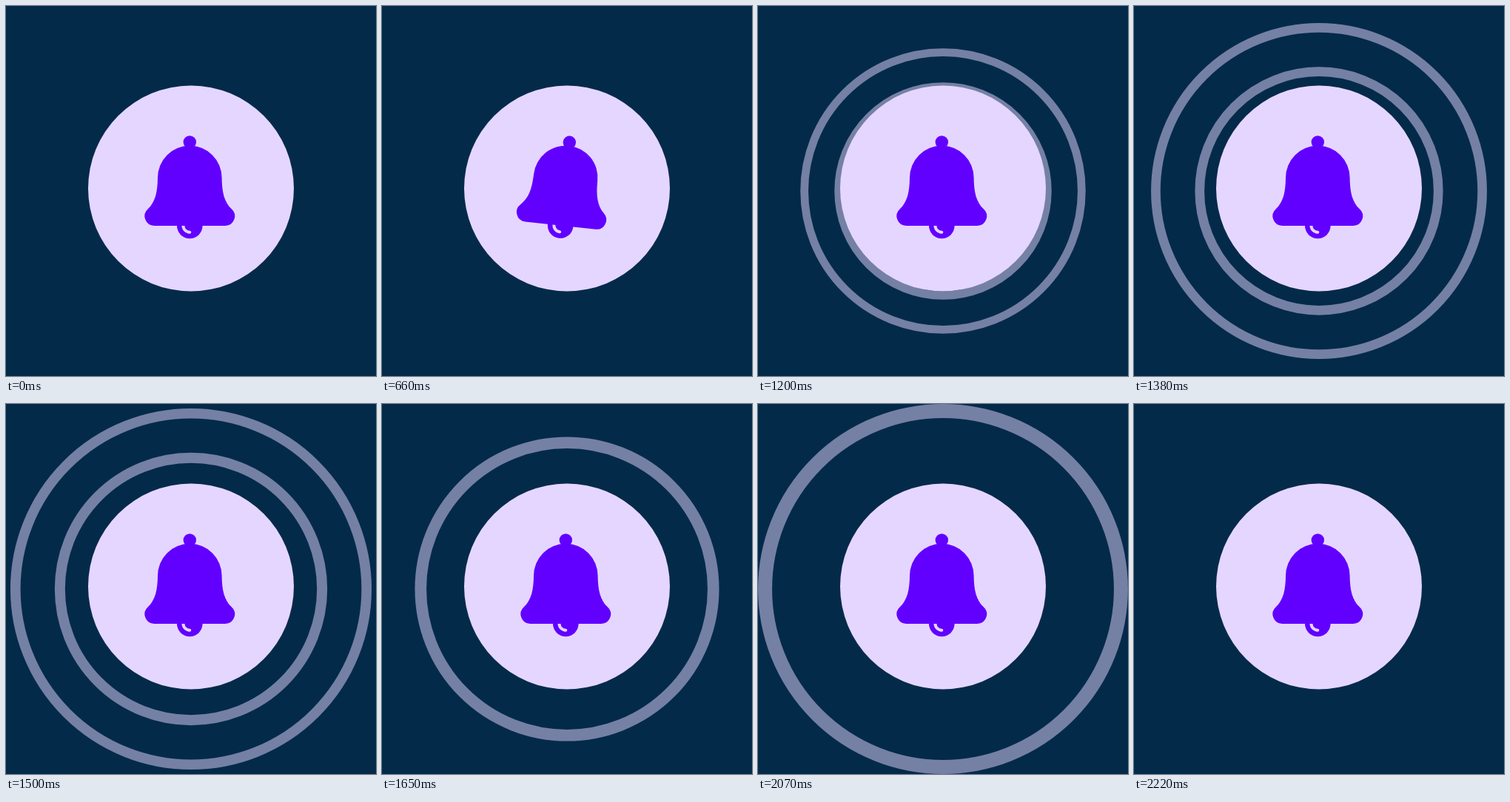
An HTML page for the animation above (2730 ms loop, 500 px wide and 500 px high).

```html
<!DOCTYPE html>
<html lang="en">
<head>
<meta charset="utf-8">
<title>Ringing bell</title>
<style>
  html, body { margin: 0; width: 100%; height: 100%; overflow: hidden; background: #042a4a; }
  svg { display: block; width: 100%; height: 100%; }
</style>
</head>
<body>
<svg viewBox="0 0 500 500">
  <g fill="none" stroke="#e5d6ff" stroke-opacity=".5">
    <circle id="outer" cx="250" cy="250"/>
    <circle id="inner" cx="250" cy="250"/>
  </g>
  <circle cx="250" cy="246.5" r="139" fill="#e5d6ff"/>
  <g id="bell" fill="#6200ff">
    <circle cx="248.3" cy="184" r="8.7"/>
    <circle cx="248.3" cy="297" r="17.3"/>
    <path d="M239.5 294V297A8.8 8.8 0 0 0 248.3 305.7" fill="none" stroke="#e5d6ff" stroke-width="4" stroke-linecap="round"/>
    <path d="M205 232A43.3 43.3 0 0 1 291.6 232C291.8 252 295 265 304.8 274.3A13 13 0 0 1 296.2 297H200.4A13 13 0 0 1 191.8 274.3C201.6 265 204.8 252 205 232Z"/>
  </g>
</svg>
<script>
  const LOOP = 2730, STEP = 30;
  const SWING_START = 420, SWING_STEP = 120;
  const swing = [0, -6.2, 6.2, -6.2, 0];
  const rings = [
    { id: 'outer', start: 750, end: 1650, gone: 1650, weight: 0.056 },
    { id: 'inner', start: 930, end: 2190, gone: 2220, weight: 0.076 }
  ];
  const get = id => document.getElementById(id);
  const clamp = (x, max) => Math.min(max, Math.max(0, x));
  const ease = u => u * u * (3 - 2 * u);

  function bellAngle(t) {
    const last = swing.length - 1;
    const pos = clamp((t - SWING_START) / SWING_STEP, last);
    const i = Math.min(Math.floor(pos), last - 1);
    return swing[i] + (swing[i + 1] - swing[i]) * ease(pos - i);
  }

  function drawRing({ id, start, end, gone, weight }, t) {
    const edge = 132.5 + 120.5 * ease(clamp((t - start) / (end - start), 1));
    const ring = get(id);
    ring.setAttribute('r', edge * (1 - weight / 2));
    ring.setAttribute('stroke-width', edge * weight);
    ring.setAttribute('visibility', t >= start && t < gone ? 'visible' : 'hidden');
  }

  function draw() {
    const t = Math.floor(performance.now() % LOOP / STEP) * STEP;
    get('bell').setAttribute('transform', `rotate(${bellAngle(t)} 248.7 230.5)`);
    rings.forEach(ring => drawRing(ring, t));
    requestAnimationFrame(draw);
  }
  draw();
</script>
</body>
</html>
```
